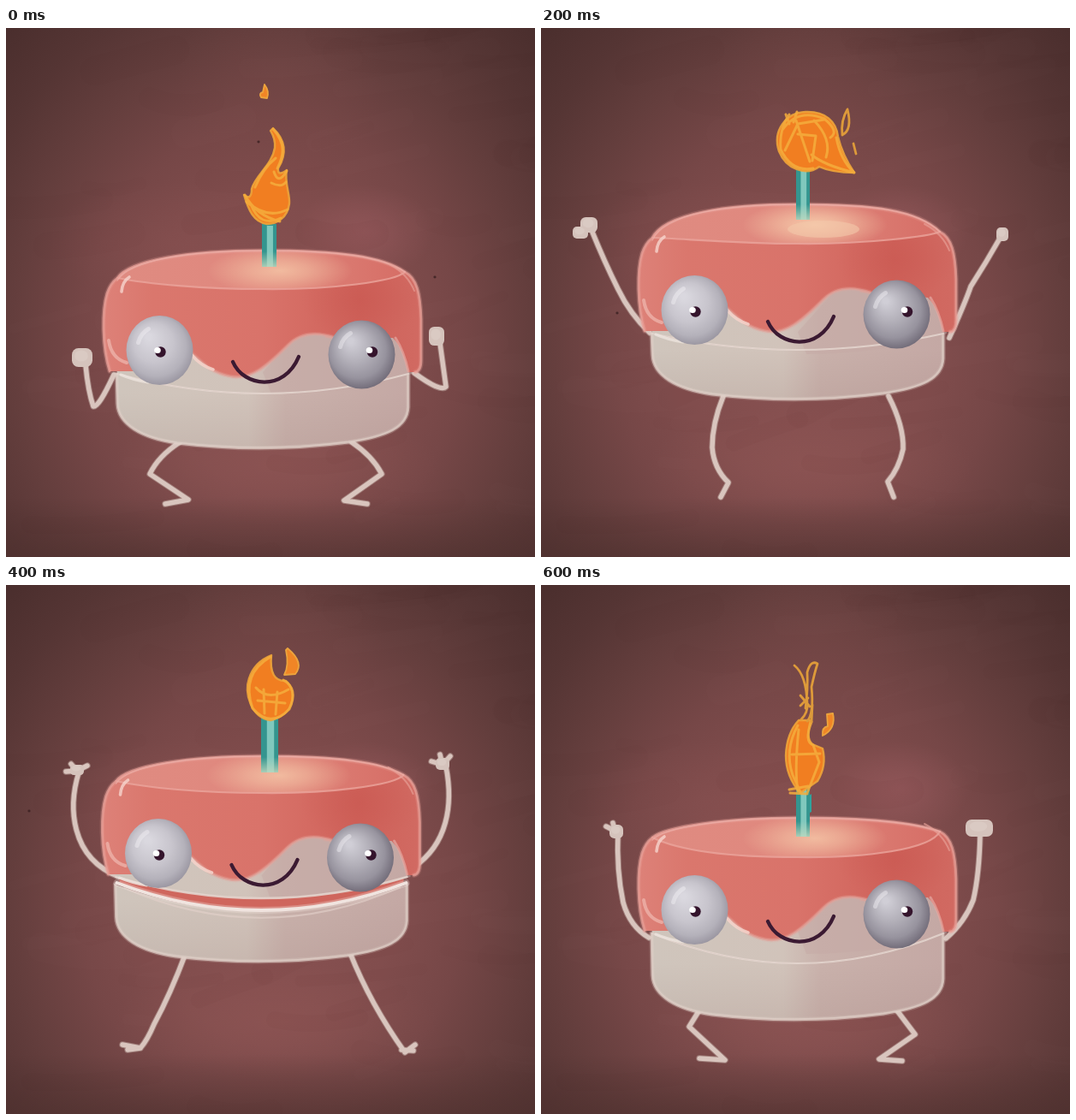
Animation, 618 px wide and 618 px high, one loop 0.7 s. Source, as an HTML page with a canvas:

```html
<!DOCTYPE html>
<html lang="en">
<head>
<meta charset="utf-8">
<title>Dancing cake</title>
<style>
  html, body { margin: 0; width: 100%; height: 100%; overflow: hidden; background: #50332f; }
  canvas { display: block; width: 618px; height: 618px; }
</style>
</head>
<body>
<canvas id="stage" width="618" height="618"></canvas>
<script>
const SIZE = 618, STEP = 100;
const stage = document.getElementById('stage');
let g = stage.getContext('2d');

// shift: cake offset; top/rim: back and front edge of the icing; drop: extra sag of the icing
// seam/lid: sponge layers; base: underside
// candle: x, width, top, bottom; fists: x, y, rx, ry
const poses = [
  {
    shift: [0, 0], top: 260, rim: 305, drop: 0, seam: 427, base: 491, candle: [299, 17, 229, 279],
    limbs: 'M93 394 Q96 425 102 442 Q108 444 126 405 M507 368 L514 419 Q508 426 477 403 M203 484 Q178 500 168 521 L213 551 L186 556 M404 484 Q428 500 439 521 L395 552 L422 556',
    fists: [[89, 385, 12, 11], [503, 360, 9, 11]],
    flame: 'M312 117 C329 133 327 149 318 164 Q317 174 328 166 C325 181 332 194 331 205 C329 222 316 229 305 229 C289 227 283 212 278 195 Q287 202 287 188 C291 172 311 160 314 140 Q315 130 309 120Z',
    lines: 'M312 118 C328 136 324 150 317 164 M313 168 Q318 184 328 167 M281 203 Q305 224 329 212 M279 195 Q292 219 320 226 M291 186 Q300 164 315 152 M310 181 Q322 187 327 180 M286 206 Q297 234 321 222',
    sparks: 'M302 66 Q308 74 305 82 L298 81 Q295 76 300 75Z', specks: [[501, 291], [295, 133]]
  },
  {
    shift: [0, -15.5], top: 261.5, rim: 307, drop: 0, seam: 432, base: 491.5, candle: [301, 15, 222, 267],
    limbs: 'M88 308 Q88 340 91 368 Q98 382 132 401 M512 277 Q512 320 506 350 Q498 376 474 400 M196 468 Q190 488 194 508 L217 554 L185 553 M403 468 Q419 482 416 500 Q405 532 395 553 L421 556',
    fists: [[91, 297, 14, 13], [514, 265, 14, 13]],
    flame: 'M331 113 C348 129 341 143 330 160 Q324 174 337 165 C339 181 338 196 332 210 C326 224 316 227 307 226 C293 223 287 205 286 190 C285 175 304 163 320 152 Q337 138 331 113Z',
    lines: 'M288 180 Q283 205 298 222 Q318 230 331 211 M337 167 L335 190', sparks: '', specks: []
  },
  {
    shift: [0, -47], top: 253, rim: 299, drop: -6, seam: 423, base: 481, candle: [298, 16, 164, 224], glow: 1,
    limbs: 'M59 236 Q74 273 90 305 Q104 334 127 356 M537 244 Q520 274 502 302 Q496 320 477 362 M213 430 Q200 462 200 490 Q202 515 219 531 L210 548 M406 430 Q424 465 423 492 Q418 515 405 530 L412 548',
    fists: [[56, 230, 10, 9], [46, 239, 9, 7], [539, 241, 7, 8]],
    flame: 'M309 98 C332 97 345 109 347 127 Q352 148 366 169 Q340 169 325 162 C309 174 286 164 278 144 C270 120 286 99 309 98Z',
    lines: 'M290 101 Q278 119 280 142 Q293 169 318 164 M282 119 Q300 93 331 106 Q349 121 338 128 M298 108 L314 156 M300 124 L321 126 L317 155 M316 148 Q330 160 366 169 Q350 155 345 128 M285 143 L300 112 L331 107 M295 110 L299 98 M286 101 L290 112 M319 108 Q340 130 333 151',
    sparks: '', wisps: 'M358 95 Q350 108 352 125 Q364 119 358 95 M365 135 L368 147', specks: [[89, 333]]
  },
  {
    shift: [0, -74], top: 260, rim: 307, drop: 0, seam: 428, base: 490, candle: [300, 14, 150, 208], dabs: [259, 345, 378],
    limbs: 'M47 238 L48 256 L31 254 M40 260 L49 258 L84 298 L126 333 M562 237 L566 260 L579 258 M568 265 L553 267 Q520 286 484 315 M213 412 Q170 456 125 491 L110 484 M120 492 L130 490 M402 412 Q435 454 490 497 L500 488 M485 494 L497 495',
    fists: [[44, 255, 8, 6], [566, 260, 9, 6]],
    flame: 'M320 95 C341 97 357 109 357 133 Q356 152 350 167 Q346 146 334 137 Q337 149 328 155 C318 148 315 154 307 157 C290 151 284 137 286 119 C288 103 302 95 320 95Z',
    lines: 'M293 111 Q285 139 308 153 M300 102 Q341 86 355 123 M333 137 L345 143 L351 166 Q359 136 350 118 M319 154 L331 139 L330 152 M295 154 L318 155',
    sparks: '', specks: [[547, 218], [316, 55]]
  },
  {
    shift: [-1.5, -63], top: 263, rim: 306, drop: 0, seam: 429, lid: 444, base: 503, candle: [298, 20, 155, 219],
    limbs: 'M70 218 L83 217 L76 209 M83 217 L95 211 M85 219 C73 258 74 318 132 341 M497 206 L510 210 L507 198 M510 210 L519 200 M514 212 C523 258 515 303 477 329 M210 430 Q192 478 173 513 Q165 532 157 541 L136 537 M142 543 L157 541 M402 430 Q426 490 466 546 L478 537 M462 543 L476 544',
    fists: [[83, 216, 8, 6], [510, 209, 8, 7]],
    flame: 'M310 82 Q307 113 327 112 C342 126 335 153 309 158 C286 155 278 126 284 109 Q290 90 310 82Z',
    lines: 'M309 84 Q274 104 288 144 Q309 168 331 145 Q342 121 324 111 M292 120 Q306 136 330 122 M301 122 L302 150 M317 125 L315 151 M294 135 L326 138',
    sparks: 'M329 74 Q349 91 338 104 L325 105 Q331 94 327 76Z', specks: [[27, 264]]
  },
  {
    shift: [0, -57], top: 274, rim: 317, drop: 7, seam: 441, lid: 453, base: 506, candle: [296, 18, 166, 233], flag: 'M313 173 L320 207 L313 210Z',
    limbs: 'M70 219 L85 219 L78 212 M85 219 L98 215 M84 222 C75 260 77 320 134 347 M493 209 L508 212 L504 203 M508 212 L516 201 M510 215 C518 254 511 289 484 320 M209 438 Q205 480 194 510 L178 553 L155 554 M403 438 Q413 500 437 562 L453 559',
    fists: [[85, 218, 8, 6], [508, 211, 8, 6]],
    flame: 'M304 84 Q315 104 316 122 Q335 130 333 149 Q331 169 318 173 Q292 171 285 151 C280 128 304 117 304 84Z',
    lines: 'M290 75 Q310 76 305 99 Q283 120 284 142 Q293 169 319 170 Q339 153 327 137 L317 122 M306 80 L310 73 M313 85 Q332 80 329 112 Q325 126 315 120 M319 91 Q309 103 318 121 M301 108 Q292 136 299 160 M298 142 L328 145 M312 128 L314 162 M323 138 L320 164 M311 107 L325 90',
    sparks: 'M335 90 L342 89 L343 106 L331 115Z', specks: [[29, 262]]
  },
  {
    shift: [0, 3], top: 269, rim: 315, drop: 4, seam: 439, base: 505, candle: [298, 16, 229, 294], flag: 'M312 247 L316 244 L316 265 L312 267Z',
    limbs: 'M76 282 L86 287 L84 278 M90 287 Q88 334 96 371 Q104 399 126 412 M513 292 Q512 338 505 368 Q495 394 473 413 M188 492 L173 516 L215 555 L185 553 M412 492 L437 525 L395 554 L422 556',
    fists: [[88, 288, 8, 8], [512, 284, 16, 10]],
    flame: 'M301 158 L315 158 Q309 179 317 186 L329 191 Q334 211 323 229 L303 243 Q286 224 286 199 Q287 173 301 158Z',
    lines: 'M300 164 Q284 193 294 222 L304 244 M316 160 Q307 183 318 187 L325 207 L311 243 M293 198 L326 197 M301 169 Q296 216 300 241 M290 239 L312 235 M291 243 L311 244',
    wisps: 'M296 94 Q310 105 311 139 Q312 149 304 157 M309 144 Q312 120 311 102 Q315 87 323 92 Q320 101 316 119 Q319 150 311 159 M303 129 L314 142 M303 141 L312 132 M317 140 L316 160',
    sparks: 'M334 151 L341 150 Q345 168 329 176 Q328 166 335 165Z', specks: []
  }
];

function fill(d, style, alpha = 1) {
  g.globalAlpha = alpha;
  g.fillStyle = style;
  g.fill(new Path2D(d));
  g.globalAlpha = 1;
}

function line(d, style, width, alpha = 1) {
  g.globalAlpha = alpha;
  g.strokeStyle = style;
  g.lineWidth = width;
  g.stroke(new Path2D(d));
  g.globalAlpha = 1;
}

// A soft wide pass under a thin one, like chalk.
function chalk(d, style, width, alpha) {
  line(d, style, width * 2, alpha * 0.3);
  line(d, style, width, alpha);
}

function oval(x, y, rx, ry, style, alpha = 1) {
  g.globalAlpha = alpha;
  g.fillStyle = style;
  g.beginPath();
  g.ellipse(x, y, rx, ry, 0, 0, Math.PI * 2);
  g.fill();
  g.globalAlpha = 1;
}

function withStops(gradient, stops) {
  for (const [at, color] of stops) gradient.addColorStop(at, color);
  return gradient;
}
const across = (x0, y0, x1, y1, stops) => withStops(g.createLinearGradient(x0, y0, x1, y1), stops);
const round = (x, y, r, stops) => withStops(g.createRadialGradient(x, y, 0, x, y, r), stops);

function glow(x, y, rx, ry, rgb, alpha) {
  g.save();
  g.translate(x, y);
  g.scale(rx, ry);
  oval(0, 0, 1, 1, round(0, 0, 1, [[0, `rgba(${rgb},${alpha})`], [0.4, `rgba(${rgb},${alpha * 0.65})`], [1, `rgba(${rgb},0)`]]));
  g.restore();
}

function seeded(seed) {
  return () => (seed = (seed * 16807) % 2147483647) / 2147483647;
}

function paintBackdrop() {
  const rand = seeded(71);
  g.save();
  g.translate(310, 370);
  g.scale(370, 430);
  g.fillStyle = round(0, 0, 1.2, [[0, '#8a5252'], [0.32, '#814d4d'], [0.5, '#764747'], [0.68, '#643e3d'], [0.84, '#553534'], [1, '#4a2e2d']]);
  g.fillRect(-1, -1, 2, 2);
  g.restore();
  glow(420, 238, 80, 55, '166,98,104', 0.4);
  glow(190, 250, 140, 70, '140,82,82', 0.3);
  glow(320, 60, 120, 120, '122,74,73', 0.35);
  glow(315, 510, 190, 70, '154,92,90', 0.35);
  g.fillStyle = across(0, 548, 0, SIZE, [[0, 'rgba(76,47,45,0)'], [1, 'rgba(76,47,45,.6)']]);
  g.fillRect(0, 548, SIZE, 70);
  for (let i = 0; i < 70; i++) {
    const x = rand() * SIZE, y = rand() * SIZE, len = 40 + rand() * 110;
    const bend = (rand() - 0.5) * 40, tone = rand() < 0.5 ? '#9a6060' : '#3c2424';
    line(`M${x} ${y} q${len / 2} ${bend} ${len} ${bend - 12}`, tone, 12 + rand() * 26, 0.02);
  }
}

function drawLimbs({ limbs, fists }) {
  line(limbs, '#b89f98', 7.4, 0.6);
  line(limbs, '#d9c5be', 5.4);
  for (const [x, y, rx, ry] of fists) {
    g.fillStyle = '#d5c3bc';
    g.beginPath();
    g.roundRect(x - rx, y - ry, rx * 2, ry * 2, Math.min(rx, ry) * 0.7);
    g.fill();
    oval(x - 1, y - 2, rx * 0.65, ry * 0.6, '#decec8', 0.6);
  }
}

function drawSponge({ seam, lid, base }) {
  const cream = across(130, 0, 470, 0, [[0, '#cfc5bc'], [0.45, '#d1c3ba'], [0.58, '#c9b1ab'], [1, '#c4a8a4']]);
  const bow = (y, end = 404) => `Q300 ${2 * y - end}`;
  const edge = lid ? 413 : 404;
  const under = `L130 ${base - 52} C131 ${base - 28} 158 ${base - 12} 200 ${base - 6} Q300 ${base + 6} 400 ${base - 7} C445 ${base - 14} 469 ${base - 24} 470 ${base - 48}`;
  fill(`M129 ${edge} ${under} L470 ${edge} ${bow(lid || seam, edge)} 129 ${edge}Z`, cream);
  fill(`M129 ${edge} ${under} L470 ${edge}Z`, across(0, seam, 0, base, [[0, 'rgba(150,125,120,0)'], [1, 'rgba(150,120,115,.16)']]));
  chalk(`M129 ${edge} ${under} L470 ${edge}`, '#e0d0c9', 2.8, 0.75);
  if (lid) {
    fill(`M134 404 ${bow(seam)} 466 404 L466 ${edge} ${bow(lid, edge)} 134 ${edge}Z`, '#cf665d');
    chalk(`M131 ${edge - 2} ${bow(lid, edge)} 469 ${edge - 2}`, '#f0e4df', 4, 1);
    line(`M140 ${edge + 4} ${bow(lid + 6, edge)} 462 ${edge + 3}`, '#e5d2cc', 2, 0.6);
  }
  fill(`M122 350 L130 404 ${bow(seam)} 470 404 L478 350Z`, cream);
  fill('M345 352 L478 350 L474 404 Q400 428 310 428 L300 402Z', '#c5aaa6', 0.5);
  line(`M130 404 ${bow(seam)} 470 404`, '#e6d8d1', lid ? 2.6 : 2, 0.85);
  line('M134 405 Q148 411 166 414', '#eee5df', 3, 0.8);
}

function drawIcing({ top, rim, drop, glow: bright, dabs }) {
  const back = `C144 ${top + 11} 215 ${top} 300 ${top} C390 ${top} 440 ${top + 7} 466 285`;
  const front = `C455 ${rim - 9} 380 ${rim + 1} 300 ${rim} C230 ${rim} 165 ${rim - 6} 130 292`;
  const wave = `L385 ${362 + drop} Q350 ${350 + drop} 330 ${370 + drop} C305 ${395 + drop} 285 ${412 + drop} 262 ${407 + drop} C235 ${402 + drop} 225 ${385 + drop} 212 ${376 + drop}`;
  const sides = `M121 401 C112 372 112 330 118 310 Q122 298 130 292 ${back} C480 292 484 310 485 340 L485 388 Q485 401 478 402`;
  const shape = `${sides} L470 402 C466 385 462 372 452 362 ${wave} L150 401Z`;
  fill(shape, across(115, 0, 486, 0, [[0, '#dd8178'], [0.15, '#da776d'], [0.5, '#d9736a'], [0.8, '#cf625a'], [1, '#d16a62']]));
  g.save();
  g.clip(new Path2D(shape));
  glow(415, 318, 70, 45, '196,78,72', 0.3);
  g.restore();
  const lidPath = `M130 292 ${back} ${front}Z`;
  fill(lidPath, across(130, 0, 466, 0, [[0, '#df8b81'], [0.5, '#e0887e'], [1, '#d66e66']]));
  g.save();
  g.clip(new Path2D(lidPath));
  const mid = (top + rim) / 2 + 1;
  glow(320, mid, 85, 28, '246,200,168', bright ? 1 : 0.8);
  if (bright) oval(330, mid + 5, 42, 10, '#f4c9ab', 0.6);
  for (const x of dabs || []) oval(x, mid + 1, x === 345 ? 19 : 13, 13, '#f0b9a2', 0.75);
  g.restore();
  line(`M466 285 ${front}`, '#eba69d', 2.2, 0.8);
  chalk(sides, '#e9a198', 2.8, 0.75);
  line(`M130 295 ${back}`, '#efb5ad', 1.4, 0.6);
  line('M448 276 Q469 287 477 307', '#e9a199', 2, 0.65);
  chalk(`M374 ${360 + drop} ${wave}`, '#e2a097', 2.6, 0.7);
  line('M455 362 Q465 378 470 401', '#e5aaa2', 3, 0.7);
  line('M135 308 Q136 296 144 291', '#f6d4cd', 3.6, 0.8);
  line('M120 365 Q123 386 141 391', '#efb9b1', 4, 0.7);
  line(`M217 ${382 + drop} Q228 ${395 + drop} 242 ${399 + drop}`, '#f4d3cb', 3.5, 0.85);
}

function drawEye(x, y, ry, stops, px, wx) {
  oval(x, y, 39, ry, withStops(g.createRadialGradient(x - 13, y - 16, 3, x - 2, y - 2, 43), stops));
  line(`M${x - 25} ${y - 9} Q${x - 22} ${y - 20} ${x - 13} ${y - 25}`, '#f1f0f5', 5, 0.45);
  oval(px, 378.5, 6.2, 6.2, '#34142c');
  oval(wx, 376.5, 3.8, 3.6, '#fff');
}

function drawFace() {
  drawEye(179.5, 376.5, 40.5, [[0, '#dad8df'], [0.5, '#c8c5cd'], [0.8, '#b4b1ba'], [1, '#9a96a1']], 180.5, 177);
  drawEye(415.5, 381.5, 40, [[0, '#d0ced6'], [0.4, '#b3b0b9'], [0.75, '#97939e'], [1, '#716b78']], 428, 424.5);
  line('M265 390 C278 420 325 425 342 384', '#3b1a32', 4.4);
}

function drawCandle({ candle: [x, w, top, bottom], flag }) {
  const foot = bottom - 14;
  if (flag) fill(flag, '#2fa39d');
  const fade = (a, b) => across(0, foot - 4, 0, bottom, [[0, a], [1, b]]);
  g.fillStyle = fade('#34958f', '#a9cdb6');
  g.fillRect(x, top, w, bottom - top);
  g.fillStyle = fade('#80c8bd', '#b4d6bf');
  g.fillRect(x + w * 0.34, top + 2, w * 0.42, bottom - top - 2);
}

function drawFlame({ flame, lines, sparks, wisps, specks }) {
  fill(flame, '#f17e21');
  line(flame, '#eea53a', 2.4, 0.9);
  line(lines, '#f5ad3c', 3, 0.85);
  if (sparks) {
    fill(sparks, '#f08526');
    line(sparks, '#eca43d', 1.8);
  }
  if (wisps) line(wisps, '#dd9a3a', 2.8);
  for (const [x, y] of specks) oval(x, y, 1.6, 1.4, '#3a1f20', 0.8);
}

function softBrush() {
  g.lineCap = g.lineJoin = 'round';
}

function draw(pose) {
  g.drawImage(backdrop, 0, 0);
  drawLimbs(pose);
  g.save();
  g.translate(...pose.shift);
  drawSponge(pose);
  drawIcing(pose);
  drawFace();
  g.restore();
  drawCandle(pose);
  drawFlame(pose);
}

const backdrop = document.createElement('canvas');
backdrop.width = backdrop.height = SIZE;
const main = g;
g = backdrop.getContext('2d');
softBrush();
paintBackdrop();
g = main;
softBrush();

const start = performance.now();
let shown = -1;
function tick() {
  const now = Math.floor((performance.now() - start) / STEP) % poses.length;
  if (now !== shown) draw(poses[shown = now]);
  requestAnimationFrame(tick);
}
tick();
</script>
</body>
</html>
```
